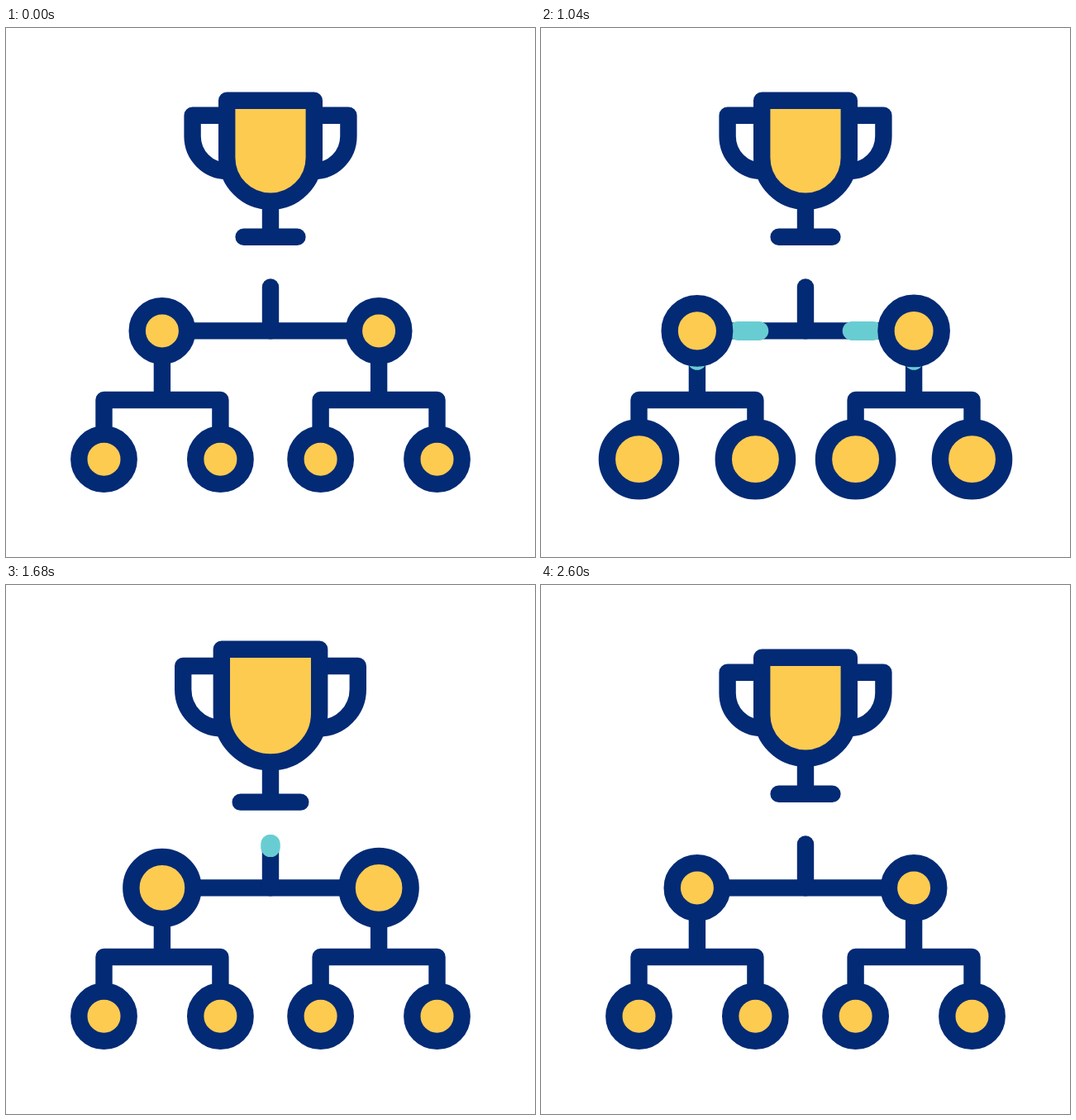
An HTML page with a canvas for the animation above (3 s loop, 640 by 640 pixels).

```html
<!DOCTYPE html>
<html lang="en">
<head>
<meta charset="utf-8">
<title>Tournament bracket</title>
<style>
  html, body { margin: 0; width: 100%; height: 100%; overflow: hidden; background: #fff; }
  canvas { display: block; }
</style>
</head>
<body>
<canvas id="stage" width="640" height="640"></canvas>
<script>
const ctx = document.getElementById('stage').getContext('2d');
const NAVY = '#032a75', YELLOW = '#fdcb50', TEAL = '#68cdd2';
const LOOP = 3000, LINE = 20.4, GLOW = 23;

// Eased progress from 0 to 1 between two times
function ease(t, start, end) {
  const u = Math.min(1, Math.max(0, (t - start) / (end - start)));
  return u * u * (3 - 2 * u);
}

// Rises, holds and falls back
const pulse = (t, a, b, c, d) => ease(t, a, b) - ease(t, c, d);

function polyline(points) {
  const path = new Path2D();
  points.forEach(([x, y]) => path.lineTo(x, y));
  return path;
}

function stroke(path, color = NAVY, width = LINE, cap = 'butt') {
  ctx.strokeStyle = color;
  ctx.lineWidth = width;
  ctx.lineCap = cap;
  ctx.stroke(path);
}

function mirrored(draw) {
  [1, -1].forEach(side => {
    ctx.save();
    ctx.translate(320, 0);
    ctx.scale(side, 1);
    ctx.translate(-320, 0);
    draw(side);
    ctx.restore();
  });
}

const OUTER = 118.5, INNER = 259.4, MID = 188.9;
const BASE_Y = 521.7, BAR_Y = 450, NODE_Y = 366.4, TIP_Y = 313.5;
const fork = polyline([[OUTER, BASE_Y], [OUTER, BAR_Y], [INNER, BAR_Y], [INNER, BASE_Y]]);
const riser = polyline([[MID, BAR_Y], [MID, NODE_Y], [320, NODE_Y]]);
const stem = polyline([[320, NODE_Y], [320, TIP_Y]]);

// Routes of the travelling light: points, then their total length
function route(...points) {
  let length = 0;
  for (let i = 1; i < points.length; i++) {
    length += Math.hypot(points[i][0] - points[i - 1][0], points[i][1] - points[i - 1][1]);
  }
  return { path: polyline(points), length };
}
const lowerRoutes = [OUTER, INNER].map(x => route([x, BASE_Y], [x, BAR_Y], [MID, BAR_Y], [MID, 402]));
const upperRoute = route([MID, NODE_Y], [320, NODE_Y], [320, TIP_Y]);

function light({ path, length }, head, tail) {
  if (head <= 0 || tail >= 1) return;
  ctx.setLineDash([Math.max(0.01, (head - tail) * length), 2 * length]);
  ctx.lineDashOffset = -tail * length;
  stroke(path, TEAL, GLOW, 'round');
  ctx.setLineDash([]);
}

function node(x, y, grow) {
  const circle = new Path2D();
  circle.arc(x, y, 30.2 + grow, 0, 2 * Math.PI);
  ctx.fillStyle = YELLOW;
  ctx.fill(circle);
  stroke(circle);
}

// Outlines scale about the centre while the line weight stays the same
function trophy(scale) {
  const X = x => 320 + (x - 320) * scale;
  const Y = y => 171 + (y - 171) * scale;

  const handle = new Path2D();
  handle.moveTo(X(267.2), Y(105.8));
  handle.lineTo(X(225.6), Y(105.8));
  handle.lineTo(X(225.6), Y(131));
  handle.arc(X(267.6), Y(131), 42 * scale, Math.PI, Math.PI / 2, true);
  mirrored(() => stroke(handle));

  stroke(polyline([[320, Y(209.8)], [320, Y(252.8)]]));
  stroke(polyline([[X(287.6), Y(252.8)], [X(352.4), Y(252.8)]]), NAVY, LINE, 'round');

  const cup = new Path2D();
  cup.moveTo(X(267.2), Y(87.8));
  cup.lineTo(X(372.8), Y(87.8));
  cup.arc(320, Y(157), 52.8 * scale, 0, Math.PI);
  cup.closePath();
  ctx.fillStyle = YELLOW;
  ctx.fill(cup);
  stroke(cup);
}

function draw(t) {
  ctx.fillStyle = '#fff';
  ctx.fillRect(0, 0, 640, 640);
  ctx.lineJoin = 'round';

  mirrored(() => { stroke(fork); stroke(riser); });
  stroke(stem, NAVY, LINE, 'round');

  const low = pulse(t, 40, 600, 860, 1400);
  const mid = pulse(t, 830, 1370, 1530, 2080);
  const top = pulse(t, 1280, 1760, 1970, 2550);

  mirrored(() => {
    lowerRoutes.forEach(r => light(r, ease(t, 32, 932), ease(t, 80, 1050)));
    light(upperRoute, ease(t, 575, 1640), ease(t, 660, 1780));
  });
  mirrored(side => {
    node(OUTER, BASE_Y, 11.4 * low);
    node(INNER, BASE_Y, 11.4 * low);
    node(MID, NODE_Y, (side > 0 ? 9 : 10.2) * mid);
  });
  trophy(1 + 0.13 * top);
}

function tick() {
  draw(performance.now() % LOOP);
  requestAnimationFrame(tick);
}
tick();
</script>
</body>
</html>
```
